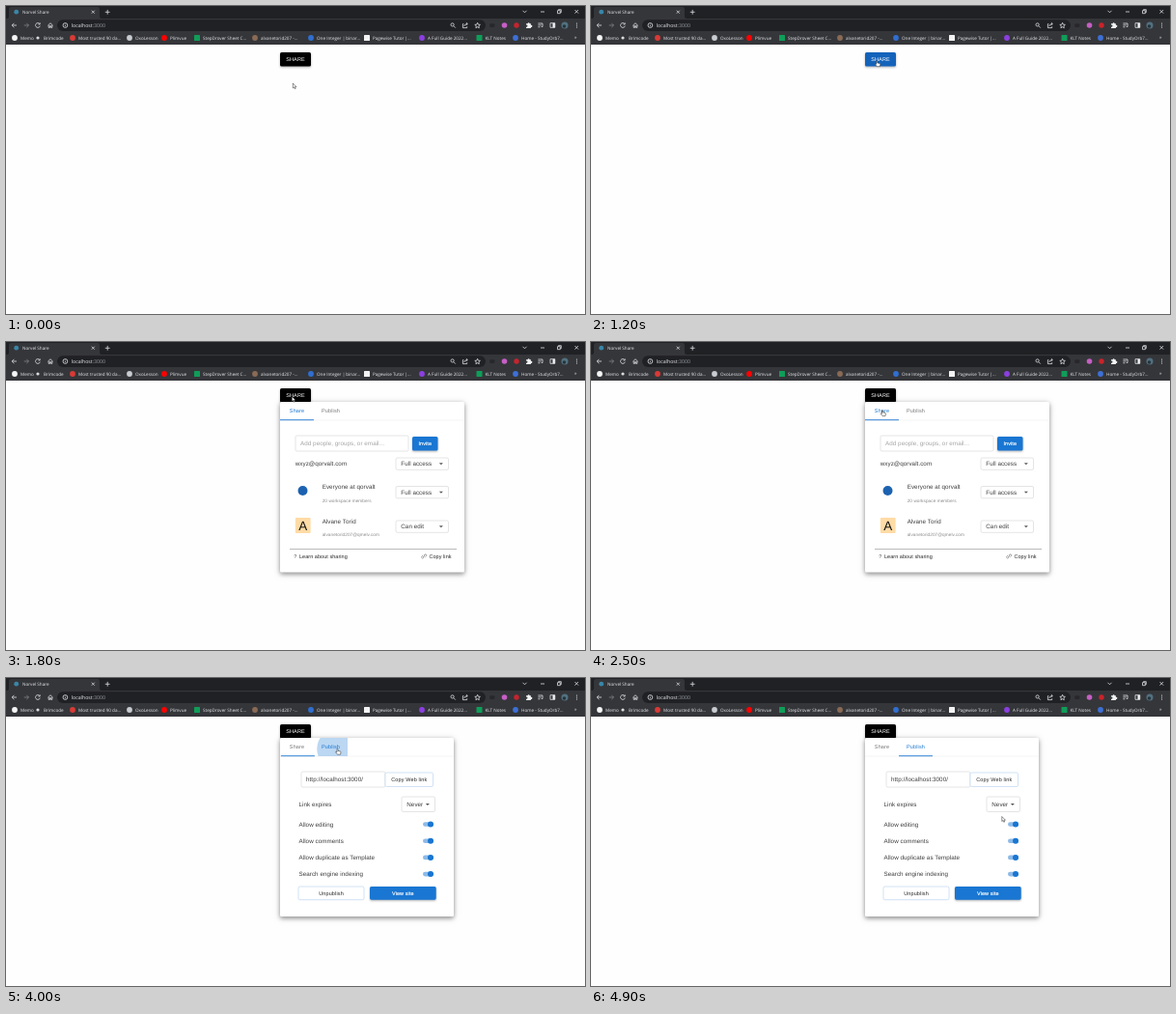
Recreate the animation shown at these times as an HTML page. Size 600 px wide and 319 px high, loop 5 s.

```html
<!DOCTYPE html>
<html lang="en">
<head>
<meta charset="utf-8">
<title>Share dialog</title>
<style>
  html, body { margin: 0; width: 100%; height: 100%; overflow: hidden; background: #fefefe; }
  svg { display: block; width: 600px; height: 319px; text-rendering: geometricPrecision; }
  text { font-family: "Liberation Sans", Arial, sans-serif; white-space: pre; }
  .ui { font-family: "Open Sans", "Noto Sans", sans-serif; }
  .body { letter-spacing: .059px; }
  .button { letter-spacing: .15px; }
  .strong { letter-spacing: .1px; stroke: #fff; stroke-width: .15px; }
  .line { fill: none; stroke: #dfe1e5; stroke-width: .8; }
  .paper { filter: drop-shadow(0 2px 2px rgba(0,0,0,.3)) drop-shadow(0 1px 3px rgba(0,0,0,.2)); }
  .raised { filter: drop-shadow(0 1px .8px rgba(0,0,0,.3)); }
</style>
</head>
<body>
<svg id="stage" viewBox="0 0 600 319"></svg>
<script>
const BLUE = '#1976d2', LOOP = 5000, OPEN = 1385, PRESS = 3720, SWITCH = 3950;

const rect = (x, y, w, h, fill, rx = 0, attrs = '') =>
  `<rect x="${x}" y="${y}" width="${w}" height="${h}" fill="${fill}" rx="${rx}" ${attrs}/>`;
const dot = (x, y, r, fill) => `<circle cx="${x}" cy="${y}" r="${r}" fill="${fill}"/>`;
const line = (d, attrs = '') => `<path class="line" d="${d}" ${attrs}/>`;
// The y of a text is the middle of its capitals.
const text = (x, y, string, size, fill, cls = 'body', anchor = 'start') =>
  `<text x="${x}" y="${y + size * .36}" font-size="${size}" fill="${fill}" class="${cls}" text-anchor="${anchor}">${string}</text>`;
const box = (x, y, w, h, stroke = '#c8c8c8') =>
  rect(x, y, w, h, '#fff', 1.5, `stroke="${stroke}" stroke-width=".5"`);
const label = (x, y, string, fill = '#3c3c3c') => text(x, y, string, 6.25, fill);
const button = (x, y, w, h, string) => rect(x, y, w, h, BLUE, 1.6, 'class="raised"') +
  text(x + w / 2, y + h / 2, string, 5.47, '#fff', 'strong', 'middle');
const outlined = (x, y, w, h, string) => box(x, y, w, h, '#a3c5ea') +
  text(x + w / 2, y + h / 2, string, 5.47, '#222', 'button', 'middle');
const select = (x, y, w, h, string) => box(x, y, w, h) + label(x + 5.3, y + h / 2, string) +
  `<path d="M${x + w - 9.6} ${y + h / 2 - .8}h4l-2 2z" fill="#555"/>`;
const toggle = y => rect(432, y - 2.3, 11, 4.6, '#8cbae8', 2.3) + dot(440, y, 3, BLUE);

function browser() {
  const bookmarks = [
    [9, 'Memo', '#f5f5f5'], [33, 'Brimcode', '#ddd'], [69, 'Most trusted 90 da...', '#d93a35'],
    [128, 'OxoLesson', '#c9ccd1'], [164, 'Plimvue', '#f00'], [198, 'StepDrover Sheet C...', '#0f9d58', 1],
    [258, 'alvanetorid207 -...', '#8a6a55'], [316, 'One Integer | binar...', '#2f6fd0'],
    [374, 'Pagewise Tutor |...', '#f3f3f3', 1], [431, 'A Full Guide 2022...', '#8b3fe0'],
    [490.5, 'KLT Notes', '#0f9d58', 1], [528, 'Home - StudyOrb7...', '#3d6fd6']
  ];
  return rect(0, 0, 600, 13, '#202124') + rect(0, 13, 600, 27, '#35363a') +
    `<path d="M1 13q2 0 2-2V3q0-2 2-2H95q2 0 2 2v8q0 2 2 2z" fill="#35363a"/>` +
    dot(10.7, 6.2, 2.4, '#3a86a8') + text(17, 6.2, 'Norvel Share', 4.6, '#e8eaed', 'ui') +
    line('M88.8 4.7l3 3m0-3l-3 3M105.2 3.9v4.8m-2.4-2.4h4.8') +
    line('M535.5 4.8l2 2 2-2M554 6h4M571.5 4.7h2.8v3h-2.8zM572.5 4.5v-.8h2.8v3h-.8M589.5 4l3.6 3.6m0-3.6l-3.6 3.6', 'stroke-width=".6"') +
    rect(53, 14.3, 444, 11.6, '#202124', 5.8) +
    line('M11 20H6.2m2.2-2.2L6.2 20l2.2 2.2') +
    line('M18.7 20h4.8m-2.2-2.2l2.2 2.2-2.2 2.2', 'style="stroke:#808388"') +
    line('M34.8 18.4a2.4 2.4 0 1 0 .5 2.2M35.2 17.4v1.6h-1.7') +
    line('M43.4 20.2l2.6-2.5 2.6 2.5M44.2 19.8v2.6h1.2v-1.8h1.2v1.8h1.2v-2.6') +
    line('M59 20a2.4 2.4 0 1 0 4.8 0a2.4 2.4 0 1 0-4.8 0M61.4 19.7v1.5m0-2.6v.5', 'stroke-width=".5"') +
    text(67.7, 20, 'localhost<tspan fill="#9aa0a6">:3000</tspan>', 5.25, '#e8eaed', 'ui') +
    line('M461 19.4a1.6 1.6 0 1 0 3.2 0a1.6 1.6 0 1 0-3.2 0M463.8 20.6l2 2') +
    line('M474.3 18.6h-.9v4h4.3v-1.4M474.8 21q.3-2.5 3.4-2.5m-1.3-1.3l1.4 1.3-1.4 1.3', 'stroke-width=".6"') +
    line('M488.6 17.3l.8 1.9 2 .2-1.5 1.3.4 2-1.7-1-1.7 1 .4-2-1.5-1.3 2-.2z', 'stroke-width=".6"') +
    rect(501.3, 18.3, 5, 3.8, '#27282b', 1) + dot(516.5, 20, 2.8, '#c65fc4') + dot(529, 20, 2.7, '#c8232c') +
    `<path d="M539 18.3h1.6a1 1 0 1 1 2 0h1.3v1.6a1 1 0 1 1 0 1.8v1.2h-4.9v-1.4a1 1 0 1 0 0-1.8z" fill="#f1f3f4"/>` +
    line('M551.4 18h4.6M551.4 19.9h3.2M551.4 21.8h2M556 18v3.5h-1.2') +
    line('M564 17.7h4.8v4.6H564z') + rect(566.5, 17.7, 2.3, 4.6, '#f1f3f4') +
    dot(579, 20, 3.5, '#52707f') + dot(578.5, 21, 1.7, '#24363d') +
    [18, 20, 22].map(y => dot(591.5, y, .6, '#e8eaed')).join('') +
    bookmarks.map(([x, name, color, square]) =>
      (square ? rect(x - 3, 30, 6, 6, color, .5) : dot(x, 33, name === 'Brimcode' ? 1.6 : 2.9, color)) +
      text(x + 6, 33, name, 4.6, '#e8eaed', 'ui')).join('') +
    text(589, 32.6, '»', 5, '#e8eaed', 'ui');
}

const paper = (w, h) => rect(284, 62, w, h, '#fff', 1.5, 'class="paper"') +
  line(`M284 81h${w}`, 'style="stroke:#e2e2e2;stroke-width:.4"');
const tabs = active => ['Share', 'Publish'].map((name, i) =>
  text(301.5 + 35 * i, 71.5, name, 5.47, i === active ? BLUE : '#757575', 'button', 'middle')).join('');

function sharePanel() {
  return paper(191, 176.5) + tabs(0) +
    box(300, 97, 117, 16) + label(305, 105, 'Add people, groups, or email...', '#a5a5a5') +
    button(421, 98, 26.5, 14.5, 'Invite') +
    label(299.7, 126, 'wxyz@qorvalt.com') + select(404, 120, 54.5, 12.3, 'Full access') +
    dot(307.5, 154, 5, '#1c62b0') + label(327.7, 150, 'Everyone at qorvalt') +
    text(327.7, 164, '20 workspace members', 4.69, '#8a8a8a') + select(404, 149.5, 54.5, 12.3, 'Full access') +
    rect(299.8, 182, 15.8, 16, '#ffdba5', 1) + text(307.7, 190, 'A', 13.4, '#111', '', 'middle') +
    label(327.7, 185.5, 'Alvane Torid') + text(327.7, 199.7, 'alvanetorid207@qmelv.com', 4.69, '#8a8a8a') +
    select(404, 185, 54.5, 12.3, 'Can edit') +
    line('M294 214.5h173', 'style="stroke:#8c8c8c;stroke-width:.6"') +
    text(298.3, 222, '?', 5.47, '#444') + text(304, 222, 'Learn about sharing', 5.47, '#222') +
    line('M432.8 221.2l1.2-1.2q1-.6 1.6.2t-.1 1.5l-1.2 1.1M433.5 222.6l-1.1 1.1q-1 .7-1.6-.2t.2-1.5l1-1M432 223l2.4-2.3', 'style="stroke:#555;stroke-width:.5"') +
    text(438.5, 222, 'Copy link', 5.47, '#222');
}

function publishPanel() {
  const options = ['Allow editing', 'Allow comments', 'Allow duplicate as Template', 'Search engine indexing'];
  return paper(180, 185) +
    `<clipPath id="tab"><rect x="319" y="62" width="35" height="19"/></clipPath>` +
    `<g clip-path="url(#tab)"><circle id="ripple" cx="343.5" cy="73.5" fill="${BLUE}"/></g>` + tabs(1) +
    box(306, 97, 87, 16) + label(311, 105, 'http://localhost:3000/') +
    outlined(393, 98, 49.5, 14.5, 'Copy Web link') +
    label(303.5, 131, 'Link expires') + select(410, 123, 34.5, 15.5, 'Never') +
    options.map((name, i) => label(303.5, 151.5 + 17.2 * i, name) + toggle(151.5 + 17.2 * i)).join('') +
    outlined(303, 216, 68, 13.7, 'Unpublish') + button(377, 216, 68.7, 13.7, 'View site');
}

document.getElementById('stage').innerHTML = browser() +
  rect(284, 48, 32, 14.5, '#000', 1.6, 'id="trigger" class="raised"') +
  text(300, 55.2, 'SHARE', 5.47, '#fff', 'button', 'middle') +
  `<g id="dialog"><g id="share">${sharePanel()}</g><g id="publish">${publishPanel()}</g>
   ${rect(284, 80.3, 35, .9, BLUE, 0, 'id="indicator"')}</g>
   <g id="cursor" stroke-linejoin="round">
     <path id="arrow" d="M0 0v5l1.2-1 .8 1.8.9-.4-.8-1.7h1.6z" fill="#fff" stroke="#222" stroke-width=".5"/>
     <path id="hand" d="M-.5.4q.5-.7 1 0v2l2.4.6q.7.2.6 1L3 6.2H0L-1.9 3.8q0-.7.7-.5l.7.6z" fill="#fff" stroke="#222" stroke-width=".5"/>
   </g>`;

const [trigger, dialog, share, publish, indicator, ripple, cursor, arrow, hand] =
  ['trigger', 'dialog', 'share', 'publish', 'indicator', 'ripple', 'cursor', 'arrow', 'hand']
    .map(id => document.getElementById(id));

const clamp = v => Math.min(1, Math.max(0, v));
// cubic-bezier(.4, 0, .2, 1)
function ease(p) {
  if (p <= 0 || p >= 1) return clamp(p);
  let lo = 0, hi = 1;
  for (let i = 0; i < 20; i++) {
    const s = (lo + hi) / 2, x = 1.2 * s * (1 - s) ** 2 + .6 * s * s * (1 - s) + s ** 3;
    if (x < p) lo = s; else hi = s;
  }
  return lo * lo * (3 - 2 * lo);
}
const phase = (t, start, length) => ease((t - start) / length);

// Pointer stops: time, x, y
const stops = [
  [0, 297.3, 80], [700, 297.3, 79.5], [800, 296.7, 73], [1050, 296.3, 56.5], [1900, 296.3, 56.5],
  [2400, 302, 70.5], [3000, 302, 70.5], [3600, 329, 73], [3800, 343.5, 73], [4100, 343.5, 73],
  [4700, 425.8, 143.5], [LOOP, 425.8, 143.5]
];
function pointer(t) {
  const i = stops.findIndex(stop => stop[0] > t), [t0, x0, y0] = stops[i - 1], [t1, x1, y1] = stops[i];
  const p = (t - t0) / (t1 - t0);
  return [x0 + (x1 - x0) * p, y0 + (y1 - y0) * p];
}
const show = (node, on) => node.setAttribute('visibility', on ? 'inherit' : 'hidden');

function draw(t) {
  const hover = phase(t, 1000, 250) * (1 - phase(t, 1400, 250));
  const flash = .2 * phase(t, 1250, 200) * (1 - phase(t, 1400, 400));
  const mix = [21, 101, 192].map(c => Math.round(c * hover * (1 - flash) + 255 * flash));
  trigger.setAttribute('fill', `rgb(${mix})`);

  const grow = phase(t, OPEN, 231);
  show(dialog, t >= OPEN);
  dialog.setAttribute('opacity', phase(t, OPEN, 347));
  dialog.setAttribute('transform',
    `translate(284 62) scale(${.75 + .25 * grow} ${.5625 + .4375 * grow}) translate(-284 -62)`);

  show(share, t < SWITCH);
  show(publish, t >= SWITCH);
  indicator.setAttribute('x', 284 + 35 * phase(t, SWITCH + 20, 300));
  ripple.setAttribute('r', 27 * phase(t, PRESS, 550));
  ripple.setAttribute('opacity', .3 * (1 - phase(t, SWITCH, 550)));

  cursor.setAttribute('transform', `translate(${pointer(t)})`);
  const pointing = (t >= 1000 && t < 1400) || (t >= 2200 && t < 4200);
  show(hand, pointing);
  show(arrow, !pointing);
}

function tick() {
  draw(Math.floor(performance.now() % LOOP / 100) * 100);
  requestAnimationFrame(tick);
}
tick();
</script>
</body>
</html>
```
